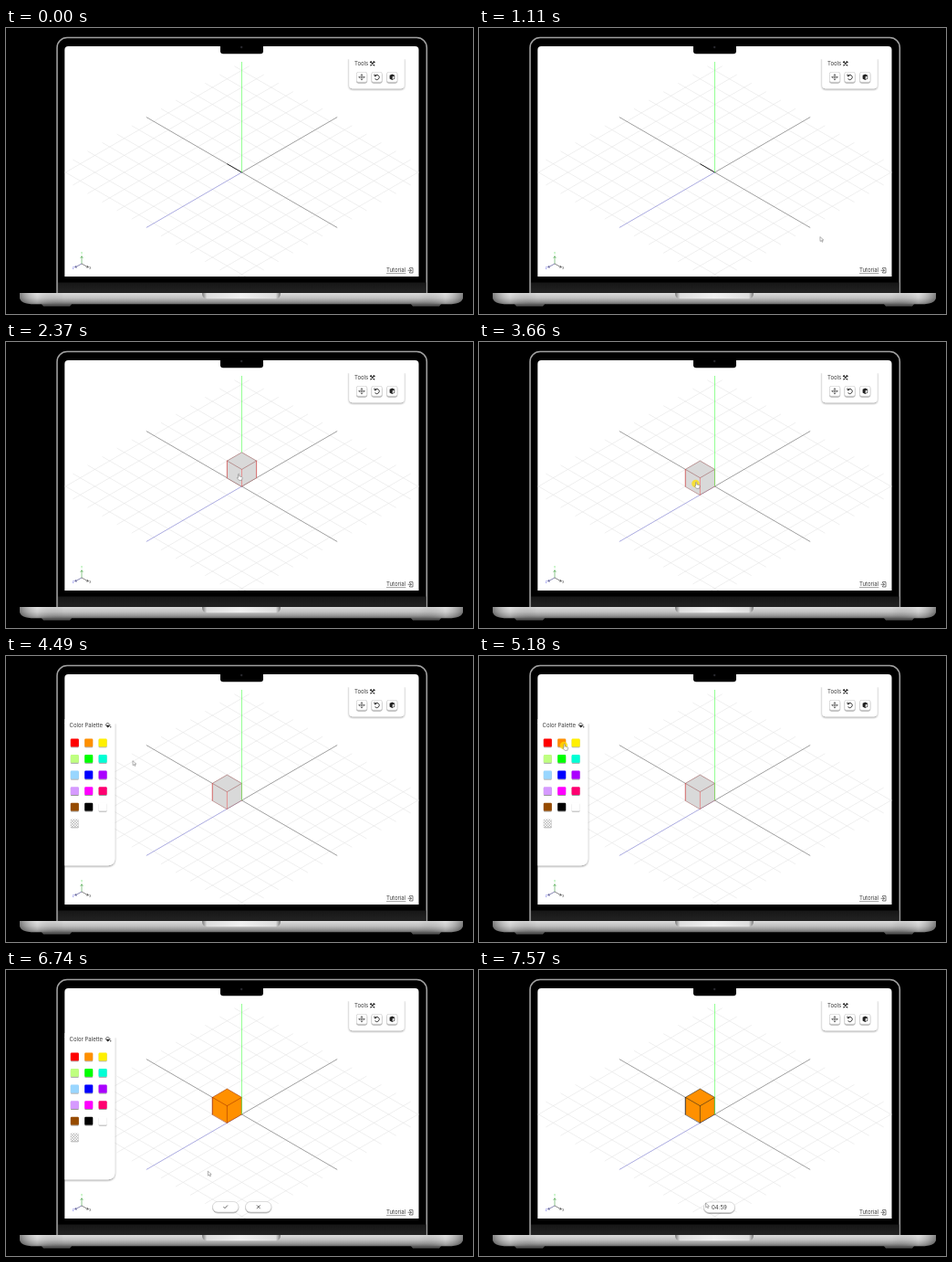
An HTML page that plays this animation: 512x313 px, repeating every 8000 ms.

```html
<!DOCTYPE html>
<html lang="en">
<head>
<meta charset="utf-8">
<title>Isometric editor</title>
<style>
  html, body { margin: 0; width: 100%; height: 100%; overflow: hidden; background: #000; }
  svg { display: block; width: 100%; height: 100%; }
  text { font: 6px Inter, sans-serif; fill: #3a3a3a; }
  .panel { fill: #fff; filter: url(#shadow); }
  .icon { fill: none; stroke: #222; stroke-width: .7; stroke-linecap: round; stroke-linejoin: round; }
  .button { fill: #fff; stroke: #bbb; stroke-width: .5; filter: url(#lift); }
</style>
</head>
<body>
<svg viewBox="0 0 512 313">
  <defs>
    <linearGradient id="metal" x2="0" y2="1">
      <stop stop-color="#dcdcdc"/><stop offset=".45" stop-color="#c0c0c0"/>
      <stop offset=".75" stop-color="#999"/><stop offset="1" stop-color="#666"/>
    </linearGradient>
    <linearGradient id="sides">
      <stop stop-color="#000" stop-opacity=".4"/><stop offset=".04" stop-color="#fff" stop-opacity=".2"/>
      <stop offset=".1" stop-color="#000" stop-opacity="0"/><stop offset=".9" stop-color="#000" stop-opacity="0"/>
      <stop offset=".96" stop-color="#fff" stop-opacity=".2"/><stop offset="1" stop-color="#000" stop-opacity=".4"/>
    </linearGradient>
    <linearGradient id="recess">
      <stop stop-color="#777"/><stop offset=".06" stop-color="#ddd"/><stop offset=".5" stop-color="#f0f0f0"/>
      <stop offset=".94" stop-color="#ddd"/><stop offset="1" stop-color="#777"/>
    </linearGradient>
    <linearGradient id="chin" x2="0" y2="1">
      <stop stop-color="#161616"/><stop offset="1" stop-color="#242424"/>
    </linearGradient>
    <filter id="shadow" x="-20%" y="-20%" width="140%" height="140%">
      <feDropShadow dx="0" dy="1" stdDeviation=".8" flood-opacity=".45"/>
    </filter>
    <filter id="lift" x="-20%" y="-20%" width="140%" height="160%">
      <feDropShadow dx="0" dy=".9" stdDeviation=".5" flood-opacity=".45"/>
    </filter>
    <pattern id="checker" width="3" height="3" patternUnits="userSpaceOnUse">
      <path fill="#fff" d="M0 0h3v3H0z"/><path fill="#bbb" d="M0 0h1.5v3H3V1.5H0z"/>
    </pattern>
    <clipPath id="screen"><path d="M64.3 272V24q0-4 4-4H448.5q4 0 4 4V272z"/></clipPath>
  </defs>

  <rect x="56" y="10.5" width="405.3" height="300" rx="11" fill="#000" stroke="#a0a0a0" stroke-width="1.6"/>
  <path d="M0 291H512V313H0z"/>
  <path d="M57 278.5H460.5V291H57z" fill="url(#chin)"/>
  <g clip-path="url(#screen)">
    <rect x="64" y="20" width="389" height="252" fill="#fff"/>
    <path id="grid" fill="none" stroke="#dedede" stroke-width=".5"/>
    <path d="M153.8 97.5L363.2 218.5M258.5 158L363.2 97.5" stroke="#555" stroke-width=".5"/>
    <path d="M258.5 158L153.8 218.5" stroke="#7878d8" stroke-width=".55"/>
    <path id="hint" d="M242.4 148.7L258.5 158" stroke="#111" stroke-width=".8"/>
    <g id="cube" stroke-linejoin="round" stroke-linecap="round" stroke-width=".55">
      <path id="faces" d="M0 0L16.1 -9.3V-27.9L0 -37.2L-16.1 -27.9V-9.3z"/>
      <path id="ridge" d="M-16.1 -27.9L0 -18.6L16.1 -27.9" fill="none"/>
      <path id="uprights" d="M0 0V-18.6M-16.1 -9.3V-27.9M16.1 -9.3V-27.9"/>
    </g>
    <line id="up" x1="258.5" x2="258.5" y1="37" stroke="#6f6" stroke-width=".7"/>

    <g fill="none" stroke-width=".65">
      <path d="M83 258V250M81.7 252L83 249.5L84.3 252" stroke="#5a5"/>
      <path d="M83 258L90 261.8M88 262L90.5 262L89.2 260" stroke="#444"/>
      <path d="M83 258L76 261.8M78 262L75.5 262L76.8 260" stroke="#448"/>
    </g>
    <text x="82" y="248" style="font-size:3px;fill:#5d5">Y</text>
    <text x="91.3" y="263.5" style="font-size:3px">X</text>
    <text x="72.8" y="263.5" style="font-size:3px;fill:#44d">Z</text>

    <path class="panel" d="M376.2 33H436.6V62.3q0 4-4 4H380.2q-4 0-4-4z"/>
    <rect x="374" y="29" width="65" height="5" fill="#fff"/>
    <text x="382" y="41.2">Tools</text>
    <path class="icon" style="stroke-width:1.1" d="M399.8 37L403.8 41M403.8 37L399.8 41M399.4 37.4L400.4 36.6M403 36.6L404.2 37.6"/>
    <g id="tools"></g>
    <path class="icon" style="stroke-width:.6" d="M390 50.8V56.8M387 53.8H393M389.2 51.6L390 50.8L390.8 51.6M389.2 56L390 56.8L390.8 56M387.8 53L387 53.8L387.8 54.6M392.2 53L393 53.8L392.2 54.6"/>
    <path class="icon" style="stroke-width:.9" d="M404.3 52.4A2.7 2.7 0 1 1 404.8 56M404 50.9V52.6H405.8"/>
    <path fill="#222" d="M423.4 50.6L426.2 51.8V55.5L423.4 57L420.6 55.5V51.8z"/>
    <path d="M423.7 53.3L425.6 52.4V55.2L423.7 56.2z" fill="#eee"/>

    <text x="417" y="267.2">Tutorial</text>
    <path d="M417 268.6H438.4" stroke="#444" stroke-width=".5"/>
    <path class="icon" style="stroke-width:.6" d="M442.5 263.5V262.6H446V268H442.5V267.1M441 265.3H444.3M443.2 264.2L444.4 265.3L443.2 266.4"/>

    <g id="palette">
      <path class="panel" d="M58 73H119.4V221.3q0 8-8 8H58z"/>
      <rect x="62" y="69" width="61" height="5" fill="#fff"/>
      <text x="69.5" y="78.3">Color Palette</text>
      <path d="M111.7 73.2L114.2 75.7L111.7 78L109.3 75.7z" class="icon"/>
      <path d="M109.5 75.8H114L111.7 78zM114.8 76.5q1.3 2 0 2q-1.3 0 0-2z" fill="#111"/>
      <g id="swatches"></g>
    </g>
    <g id="confirm">
      <rect class="button" x="226.5" y="253.5" width="28.5" height="11.5" rx="5.75"/>
      <rect class="button" x="262.5" y="253.5" width="28.5" height="11.5" rx="5.75"/>
      <path class="icon" d="M238.7 259.4L240 260.7L242.7 257.8M275.2 257.7L278.4 260.9M278.4 257.7L275.2 260.9"/>
    </g>
    <g id="timer">
      <rect class="button" x="246.5" y="254" width="34" height="11.5" rx="5.75"/>
      <text x="255" y="262">04:59</text>
    </g>
  </g>

  <path d="M235 19.5H282V25.3q0 3-3 3H238q-3 0-3-3z" fill="#000"/>
  <circle cx="258.2" cy="21" r="1.2" fill="#26262c"/>
  <path d="M38 301H73L70 304.5H41zM443 301H478L475 304.5H446z" fill="#555"/>
  <path d="M15 290H501V295q-1 7.3-16 7.3H31q-15 0-16-7.3z" fill="url(#metal)"/>
  <path d="M15 290H501V295q-1 7.3-16 7.3H31q-15 0-16-7.3z" fill="url(#sides)"/>
  <path d="M215 290H301q0 6.3-6 6.3H221q-6 0-6-6.3z" fill="url(#recess)"/>

  <circle id="click" r="4.3" fill="#ffe000" fill-opacity=".75"/>
  <g id="cursor" fill="#fff" stroke="#666" stroke-width=".5" stroke-linejoin="round">
    <path id="arrow" d="M0 0L.2 5L1.4 3.9L2.3 5.8L3.1 5.4L2.3 3.6L3.9 3.5z"/>
    <path id="hand" d="M1 .7Q1.7 -.3 2.3 .7V3L5 3.6Q5.8 3.9 5.6 4.8L5 7.3H2L-.2 4.8Q-.2 4 1 4.6z"/>
  </g>
</svg>
<script>
const LOOP = 8000;
const $ = id => document.getElementById(id);
const show = (id, on) => $(id).setAttribute('display', on ? 'inline' : 'none');
const place = (id, x, y) => $(id).setAttribute('transform', `translate(${x} ${y})`);
const during = (t, ...spans) => spans.some(([from, to]) => t >= from && t < to);

// Isometric ground coordinates to the screen
const iso = (u, v) => `${258.5 + (u - v) * 16.1} ${158 + (u + v) * 9.3}`;
let lines = '';
for (let k = -6; k <= 6; k++) {
  lines += `M${iso(k, -6.5)}L${iso(k, 6.5)}M${iso(-6.5, k)}L${iso(6.5, k)}`;
}
$('grid').setAttribute('d', lines);

$('tools').innerHTML = [384.3, 400.8, 417.5].map(x =>
  `<rect class="button" x="${x}" y="48.3" width="11.5" height="11" rx="2"/>`).join('');

const colors = ['#f00', '#ff9000', '#fff000', '#bfff80', '#0f0', '#00ffd5', '#99d6ff', '#00f',
  '#a0f', '#d69aff', '#f0f', '#ff0070', '#964b00', '#000', '#fff', 'url(#checker)'];
$('swatches').innerHTML = colors.map((color, i) =>
  `<rect x="${70.8 + i % 3 * 15.4}" y="${90.4 + Math.floor(i / 3) * 17.6}" width="9" height="8.8" rx="1"
    fill="${color}" filter="url(#lift)"/>`).join('');

// Cursor moves: start, end, x, y, time bias of the easing
const moves = [
  [700, 1490, 287, 167, 1],
  [1530, 1700, 279, 159, 1],
  [2140, 2370, 253.5, 144, 1],
  [2810, 3170, 236.5, 153, 1],
  [4070, 4870, 94, 97, .73],
  [4900, 4960, 92, 96, 1],
  [5810, 6590, 215, 212, 1.4],
  [6620, 7220, 248.5, 255, .8],
];

function cursorAt(t) {
  let x = 472, y = 298;
  for (const [from, to, toX, toY, bias] of moves) {
    if (t < from) break;
    const p = Math.min(1, (t - from) / (to - from)) ** bias;
    const eased = p * p * (3 - 2 * p);
    x += (toX - x) * eased;
    y += (toY - y) * eased;
  }
  return [x, y];
}

function draw(t) {
  const [x, y] = cursorAt(t);
  place('cursor', x, y);
  show('cursor', t >= 200);
  const hand = during(t, [1600, 4130], [4900, 5900], [7080, 7540]);
  show('hand', hand);
  show('arrow', !hand);
  place('click', x + 1, y + 2);
  show('click', during(t, [3660, 3760], [5180, 5280], [7440, 7540]));

  const centered = during(t, [2270, 2970]);
  show('hint', t < 1560);
  show('cube', t >= 1560);
  place('cube', t < 2270 ? 274.8 : centered ? 258.5 : 242.4, centered ? 158 : 167.3);
  $('up').setAttribute('y2', centered ? 120.8 : 158);

  const painted = t >= 5280, selected = during(t, [2140, 7540]);
  const edge = painted ? (selected ? '#a03000' : '#222') : selected ? '#955' : '#666';
  $('faces').setAttribute('fill', painted ? '#ff9000' : '#d9d9d9');
  $('faces').setAttribute('stroke', edge);
  $('ridge').setAttribute('stroke', edge);
  $('uprights').setAttribute('stroke', selected && !painted ? '#e55' : edge);

  show('palette', during(t, [3760, 7540]));
  show('confirm', during(t, [5280, 7540]));
  show('timer', t >= 7540);
}

const start = performance.now();
function tick() {
  draw((performance.now() - start) % LOOP);
  requestAnimationFrame(tick);
}
tick();
</script>
</body>
</html>
```
